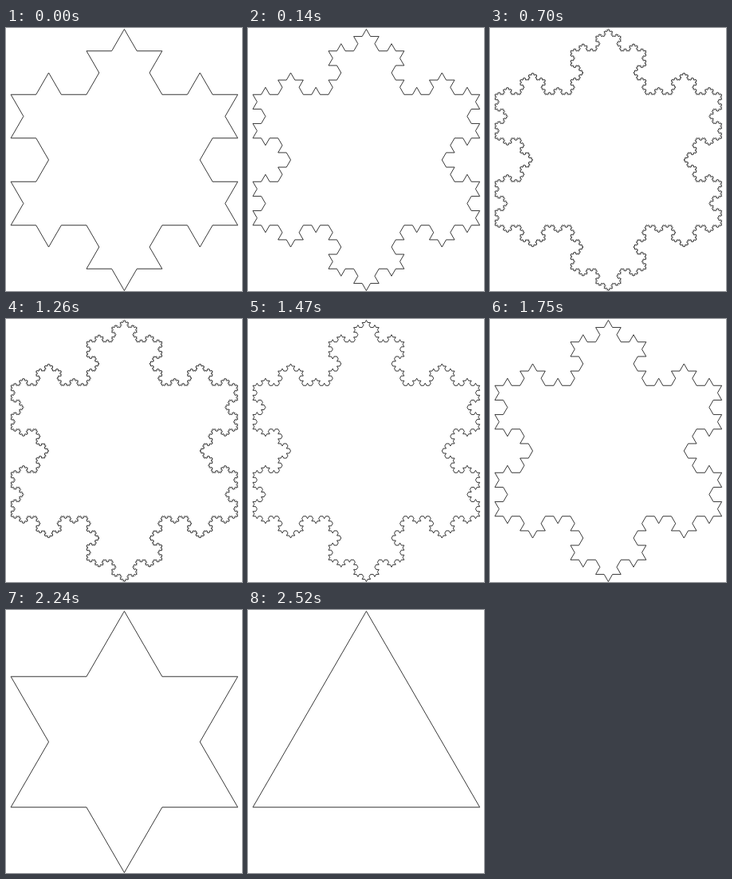
An HTML page for the animation above (2.66 s loop, 296x329 px).

```html
<!DOCTYPE html>
<html lang="en">
<head>
<meta charset="utf-8">
<title>Koch snowflake</title>
<style>
  html, body { margin: 0; width: 100%; height: 100%; overflow: hidden; background: #fff; }
  svg { display: block; width: 100vw; height: 100vh; }
  path { fill: none; stroke: #222; stroke-width: 0.9; stroke-linejoin: miter; }
</style>
</head>
<body>
<svg viewBox="0 0 296 329"><path id="curve"/></svg>
<script>
const LOOP = 2660;
// [start time in ms, recursion depth]
const STEPS = [
  [0, 2], [140, 3], [420, 4], [700, 5], [980, 6], [1260, 5],
  [1470, 4], [1750, 3], [2030, 2], [2240, 1], [2520, 0]
];
const CENTER_X = 148.4, TOP = 1.5, BOTTOM = 328.5, SIDE = 284.6;
const HEIGHT = Math.sqrt(3) / 2;
const SCALE_Y = (BOTTOM - TOP) / (HEIGHT * 4 / 3);

const corners = [[0, 0], [0.5, HEIGHT], [-0.5, HEIGHT]];

// Each edge gains an outward equilateral bump on its middle third.
function subdivide(points) {
  return points.flatMap(([x, y], i) => {
    const [nx, ny] = points[(i + 1) % points.length];
    const dx = (nx - x) / 3, dy = (ny - y) / 3;
    return [
      [x, y],
      [x + dx, y + dy],
      [x + 1.5 * dx + HEIGHT * dy, y + 1.5 * dy - HEIGHT * dx],
      [x + 2 * dx, y + 2 * dy]
    ];
  });
}

function toPath(points) {
  const spots = points.map(([x, y]) =>
    (CENTER_X + x * SIDE).toFixed(2) + ' ' + (TOP + y * SCALE_Y).toFixed(2));
  return 'M' + spots.join('L') + 'Z';
}

const paths = [];
for (let depth = 0, points = corners; depth <= 6; depth++) {
  paths.push(toPath(points));
  points = subdivide(points);
}

const curve = document.getElementById('curve');
const startTime = performance.now();
let shown = -1;

function draw() {
  const time = (performance.now() - startTime) % LOOP;
  const depth = STEPS.findLast(([start]) => start <= time)[1];
  if (depth !== shown) {
    curve.setAttribute('d', paths[depth]);
    shown = depth;
  }
  requestAnimationFrame(draw);
}
draw();
</script>
</body>
</html>
```
